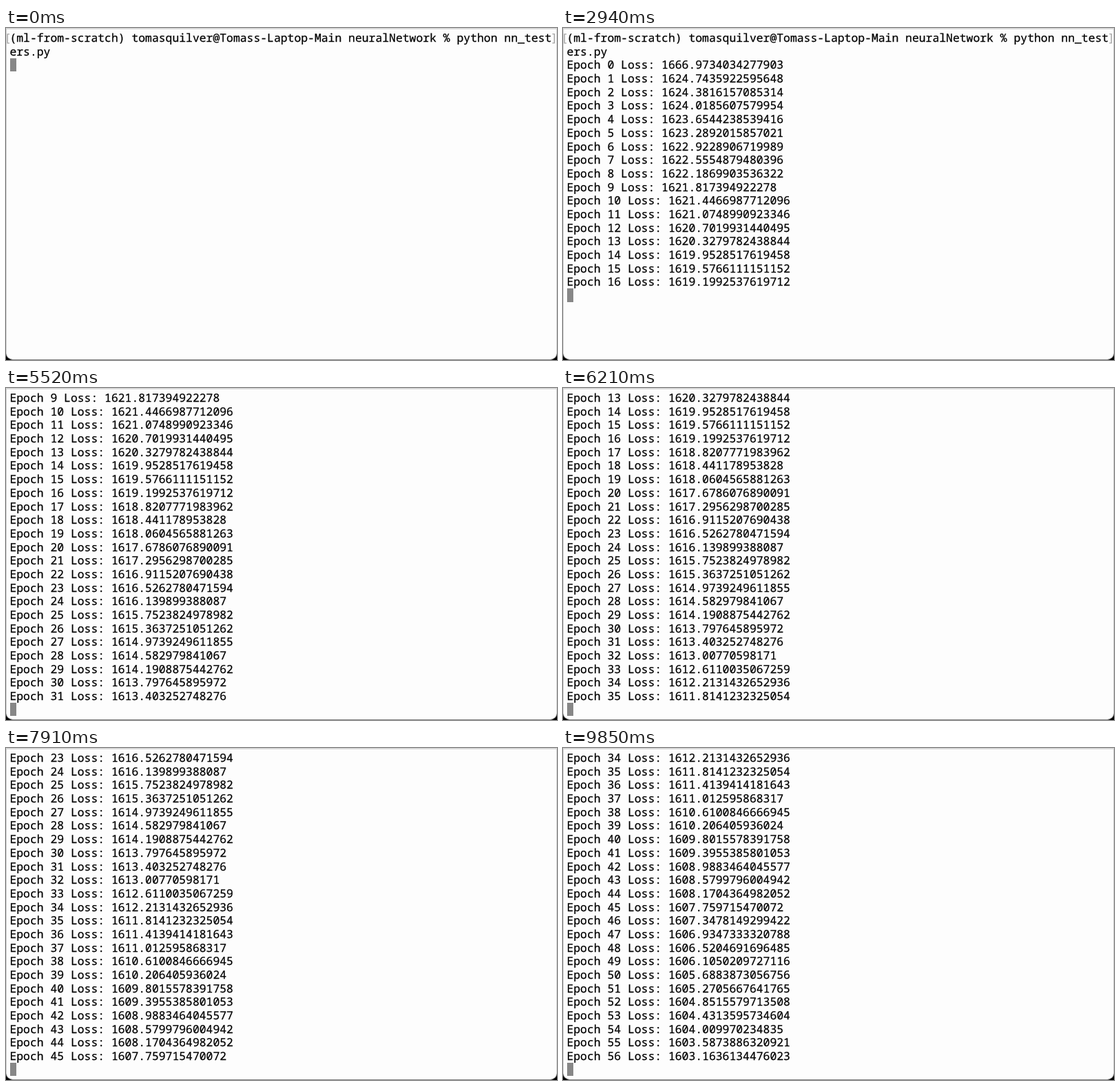
Animation, 800 px wide and 482 px high, one loop 10000 ms. Source, as an HTML page:

```html
<!DOCTYPE html>
<html lang="en">
<head>
<meta charset="utf-8">
<title>Training log</title>
<style>
html, body { margin: 0; width: 100%; height: 100%; overflow: hidden; background: #000; }
#win {
  position: absolute; left: 0; top: 0; width: 800px; height: 482px; box-sizing: border-box;
  background: #fdfdfd; border: 1px solid #cfcfcf; border-top: 2px solid #d9d9d9;
  border-bottom-color: #858585; border-radius: 0 0 10px 10px;
}
#screen { position: absolute; left: 0; top: 0; width: 800px; height: 482px; overflow: hidden; }
pre, .mark {
  position: absolute; top: 4px; margin: 0; color: #000; white-space: pre;
  font: 500 16.4px/19.68px "Noto Sans Mono", "DejaVu Sans Mono", monospace;
  font-variant-ligatures: none; text-rendering: geometricPrecision;
}
pre { left: 5.4px; -webkit-text-stroke: 0.25px #000; }
.mark { color: #a0a0a0; }
#cursor { position: absolute; left: 5.8px; width: 9.6px; height: 19.4px; background: #878787; }
</style>
</head>
<body>
<div id="win"></div>
<div id="screen">
  <div id="cursor"></div>
  <span class="mark" style="left:-2.5px">[</span>
  <span class="mark" style="left:791px">]</span>
  <pre id="log"></pre>
</div>
<script>
const LOOP = 10000, EPOCHS = 57, ROWS = 24, ROW_H = 19.68, TOP = 4.3;

// Key points [epoch, loss]; the curve through them is smooth after epoch 0
const FIRST_LOSS = 1666.9734034277903;
const curve = [
  [1, 1624.7435922595648], [5, 1623.2892015857021], [13, 1620.3279782438844],
  [23, 1616.5262780471594], [34, 1612.2131432652936], [44, 1608.1704364982052],
  [52, 1604.8515579713508], [56, 1603.1636134476023]
];

// Key points [lines printed, time in ms]; the lines between are evenly spaced
const pace = [[1, 240], [17, 2940], [25, 4300], [46, 7910], [57, 9850]];

// Lagrange polynomial through the curve's points
function lossAt(epoch) {
  if (epoch === 0) return FIRST_LOSS;
  const base = curve[0][1];
  return base + curve.reduce((sum, [xi, yi]) =>
    sum + curve.reduce((w, [xj]) => xj === xi ? w : w * (epoch - xj) / (xi - xj), yi - base), 0);
}

function printedAt(t) {
  if (t < pace[0][1]) return 0;
  const next = pace.findIndex(([, time]) => time > t);
  if (next < 0) return EPOCHS;
  const [n0, t0] = pace[next - 1], [n1, t1] = pace[next];
  return Math.floor(n0 + (n1 - n0) * (t - t0) / (t1 - t0) + 1e-6);
}

const prompt = [
  "(ml-from-scratch) tomasquilver@Tomass-Laptop-Main neuralNetwork % python nn_test",
  "ers.py"
];
const lines = [...prompt];
for (let i = 0; i < EPOCHS; i++) lines.push(`Epoch ${i} Loss: ${lossAt(i)}`);

const log = document.getElementById("log");
const cursor = document.getElementById("cursor");
const marks = document.querySelectorAll(".mark");

function draw(t) {
  const end = prompt.length + printedAt(t);
  const first = Math.max(0, end - ROWS + 1);
  log.textContent = lines.slice(first, end).join("\n");
  cursor.style.top = TOP + (end - first) * ROW_H + "px";
  marks.forEach(m => m.style.visibility = first ? "hidden" : "visible");
}

const start = performance.now();
function tick() {
  draw((performance.now() - start) % LOOP);
  requestAnimationFrame(tick);
}
tick();
</script>
</body>
</html>
```
